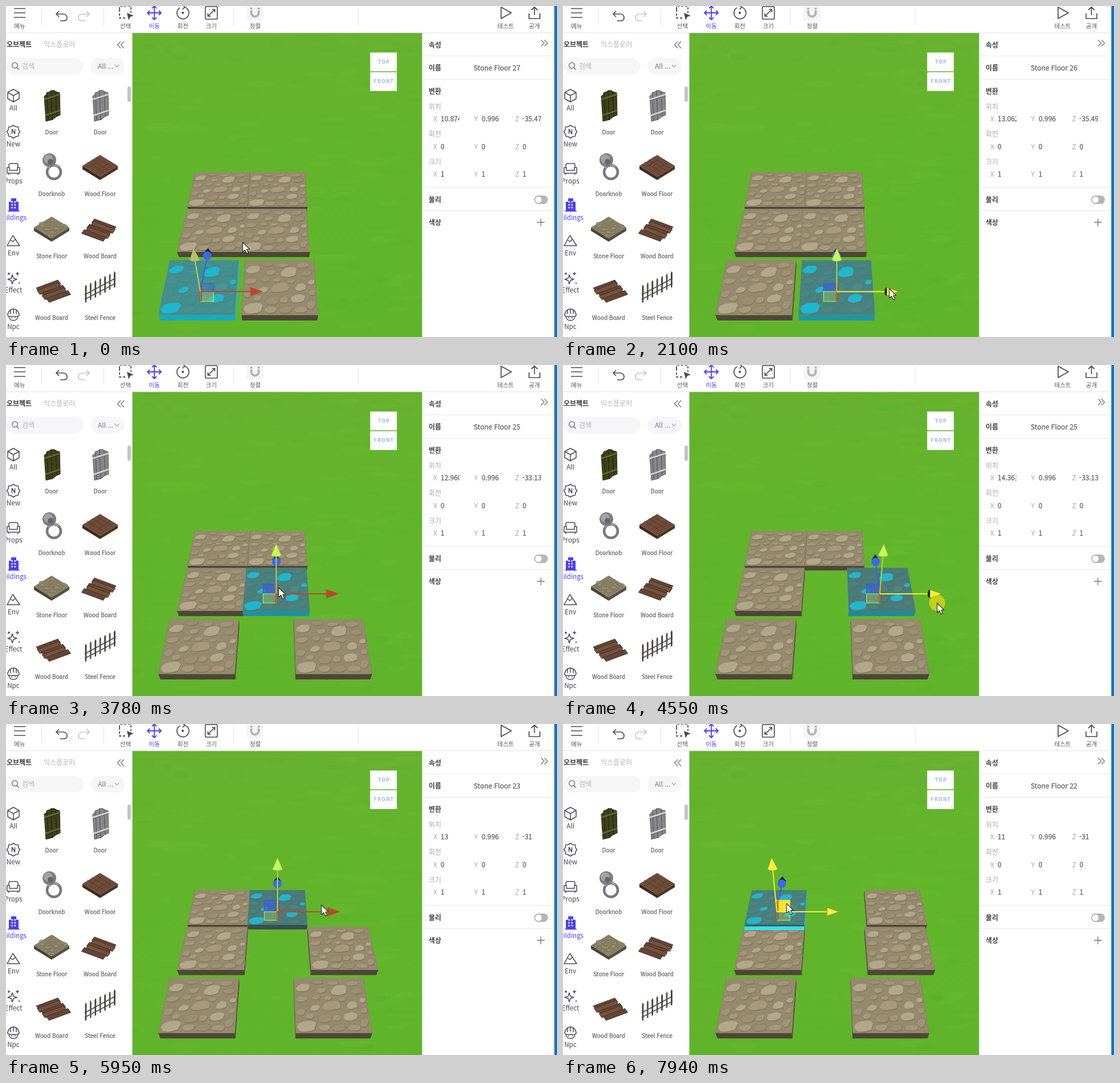
An HTML page that plays this animation: 966 by 580 pixels, repeating every 8 s.

```html
<!DOCTYPE html>
<html lang="ko">
<head>
<meta charset="utf-8">
<title>Tile editor</title>
<style>
html, body { margin: 0; width: 100%; height: 100%; overflow: hidden; background: #fff; }
svg { display: block; width: 966px; height: 580px; }
text { font-family: 'Noto Sans CJK KR', 'Noto Sans CJK JP', 'Noto Sans CJK', 'Noto Sans', sans-serif; }
.medium { stroke: currentColor; stroke-width: .3px; fill: currentColor; }
</style>
</head>
<body>
<svg viewBox="0 0 966 580" xmlns="http://www.w3.org/2000/svg">
  <defs>
    <linearGradient id="grass" x1="0" y1="0" x2="0" y2="1">
      <stop offset="0" stop-color="#66b22f"/><stop offset=".35" stop-color="#62b52a"/><stop offset="1" stop-color="#60b42b"/>
    </linearGradient>
    <clipPath id="view"><rect x="221" y="47" width="509" height="533"/></clipPath>
    <clipPath id="xBox"><rect x="755" y="185" width="40" height="24"/></clipPath>
    <clipPath id="zBox"><rect x="895" y="185" width="43" height="24"/></clipPath>
  </defs>
  <rect width="966" height="580" fill="#fff"/>
  <g clip-path="url(#view)">
    <rect x="221" y="47" width="509" height="533" fill="url(#grass)"/>
    <g id="patches"></g>
    <g id="tiles"></g>
    <g id="gizmo"></g>
  </g>
  <g id="ui"></g>
  <g id="values"></g>
  <g id="pointer"></g>
</svg>
<script>
const $ = id => document.getElementById(id);
const LOOP = 8000, STEP = 70, CX = 475;
const INK = '#4a4a55', BLUE = '#4b3ffb', CYAN = '#1cb8d0';

function seeded(seed) {
  return () => (seed = (seed * 16807) % 2147483647) / 2147483647;
}

// ---- markup helpers
const text = (x, y, s, size = 12, fill = '#555', extra = '') =>
  `<text x="${x}" y="${y}" font-size="${size}" fill="${fill}" color="${fill}" ${extra}>${s}</text>`;
const mid = 'text-anchor="middle"';
const medium = 'class="medium"';
const rect = (x, y, w, h, fill, extra = '') =>
  `<rect x="${x}" y="${y}" width="${w}" height="${h}" fill="${fill}" ${extra}/>`;
const line = (d, color = INK, w = 1.7, extra = '') =>
  `<path d="${d}" fill="none" stroke="${color}" stroke-width="${w}" ${extra}/>`;
const poly = (pts, fill, extra = '') =>
  `<polygon points="${pts.map(p => p.map(n => n.toFixed(1))).join(' ')}" fill="${fill}" ${extra}/>`;
const shape = (d, fill, extra = '') => `<path d="${d}" fill="${fill}" ${extra}/>`;
const dot = (x, y, r, fill, extra = '') => `<circle cx="${x}" cy="${y}" r="${r}" fill="${fill}" ${extra}/>`;

// ---- piecewise linear tracks: [time, value, ...]
function track(keys, t) {
  let i = 0;
  while (i < keys.length - 2 && t >= keys[i + 1][0]) i++;
  const a = keys[i], b = keys[i + 1];
  const p = Math.min(1, Math.max(0, (t - a[0]) / (b[0] - a[0])));
  return a.slice(1).map((v, n) => v + (b[n + 1] - v) * p);
}
const within = (t, spans) => spans.some(([a, b]) => t >= a && t < b);
const mix = (a, b, p) => `rgb(${a.map((v, i) => Math.round(v + (b[i] - v) * p))})`;

// ---- scene
const rows = [
  { w: 105, k: .917, top: 291, bot: 352, h: 8, gy: 329, up: 95, ball: 49, sq: 20, low: 15 },
  { w: 117.5, k: .9, top: 355.5, bot: 431, h: 9, gy: 401, up: 88, ball: 56, sq: 17, low: 16 },
  { w: 134, k: .904, top: 445.5, bot: 541.5, h: 9.5, gy: 500.5, up: 76, ball: 63, sq: 14, low: 17 }
];
const tiles = [
  { id: 22, row: 0, left: 318, x: 11, z: '-31' },
  { id: 23, row: 0, left: 423.5, x: 13, z: '-31', move: 110, dx: 2.12,
    drag: [[6200, 0], [6720, .55], [7140, .945], [7280, 1]] },
  { id: 24, row: 1, left: 300, x: 10.9, z: '-33.13' },
  { id: 25, row: 1, left: 415, x: 12.96, z: '-33.131', move: 120, dx: 1.96,
    drag: [[4200, 0], [4550, .715], [4900, 1]] },
  { id: 27, row: 2, left: 267, x: 10.874, z: '-35.471' },
  { id: 26, row: 2, left: 413, x: 13.062, z: '-35.493', move: 95, dx: 1.4,
    drag: [[2170, 0], [2520, .43], [2870, 1]] }
];
const picks = [[0, 27], [560, 26], [3750, 25], [5500, 23], [7600, 22]];
const cursorPath = [
  [0, 415, 414], [490, 480, 478], [630, 480, 478], [1200, 568, 497], [2100, 572, 495], [2200, 574, 497],
  [2520, 613, 500], [2870, 664, 505], [3150, 664, 505], [3650, 478, 390], [3850, 478, 390],
  [4150, 572, 402], [4200, 572, 403], [4550, 656, 417], [4900, 687, 420], [5110, 687, 420],
  [5450, 480, 325], [5600, 480, 325], [5950, 553, 317], [6200, 566, 328], [6720, 620, 343],
  [7140, 660, 354], [7280, 667, 358], [7380, 660, 355], [7530, 421, 325], [7750, 392, 316], [7940, 392, 314]
];
const glowKeys = [[0, .9], [2100, .65], [2870, .1], [3700, .6], [4550, .5], [5950, .5], [7140, .45], [7940, .6]];
const hovers = [[1200, 3000], [4100, 5100], [6100, 7330]];
const presses = [[2170, 2950], [4200, 5000], [6200, 7300]];

// stones in percent of the tile: u, v, rx, ry; the first six light up
const stones = [
  [13, 17, 10, 8], [63, 22, 12, 10], [94, 40, 5, 5], [28, 54, 7, 6], [75, 70, 10, 8], [15, 88, 13, 11],
  [33, 7, 9, 4], [55, 9, 9, 4], [83, 9, 10, 5], [38, 22, 7, 5], [88, 23, 8, 6], [10, 38, 9, 6],
  [30, 35, 6, 5], [51, 50, 14, 9], [79, 49, 8, 8], [94, 59, 5, 5], [8, 61, 7, 7], [20, 69, 6, 5],
  [40, 73, 10, 8], [56, 72, 6, 6], [92, 81, 6, 8], [38, 90, 9, 6], [58, 90, 9, 6], [78, 90, 9, 6],
  [66, 38, 6, 4], [46, 36, 6, 4]
];
const tones = ['#a09377', '#a6997c', '#9b8e72', '#a3967a'];

function corner(row, left, u, v) {
  const s = row.k + (1 - row.k) * v;
  return [CX + (left + u * row.w - CX) * s, row.top + (row.bot - row.top) * v];
}

function stoneSet(tile, from, to) {
  const row = rows[tile.row];
  let out = '';
  for (let i = from; i < to; i++) {
    const rnd = seeded(977 + i * 131), [u, v, rx, ry] = stones[i], pts = [];
    for (let a = 0; a < 12; a++) {
      const r = .86 + rnd() * .24, th = a * Math.PI / 6, sx = Math.cos(th) * rx * r, sy = Math.sin(th) * ry * r;
      const cu = Math.min(99, Math.max(1, u + sx - sy * .25)), cv = Math.min(98, Math.max(1, v + sy));
      pts.push(corner(row, tile.left, cu / 100, cv / 100));
    }
    const fill = i < 6 || i === 14 ? '#b3a78a' : tones[i % 4];
    const join = 'stroke-linejoin="round"';
    out += poly(pts.map(p => [p[0] + .5, p[1] + 1.2]), '#736850', `opacity=".6" ${join}`) +
      poly(pts, fill, `class="${i < 6 ? 'lit' : ''}" data-fill="${fill}" stroke="#877b61" stroke-width=".5" ${join}`);
  }
  return out;
}

function buildTile(tile) {
  const row = rows[tile.row];
  const quad = [[0, 0], [1, 0], [1, 1], [0, 1]].map(([u, v]) => corner(row, tile.left, u, v));
  $('tiles').insertAdjacentHTML('beforeend', `<g><g class="body"></g><g class="top">${
    poly(quad, '#968a6e')}${stoneSet(tile, 6, stones.length)}${poly(quad, 'none', 'class="tint" opacity=".72"')}${
    stoneSet(tile, 0, 6)}</g></g>`);
  const g = $('tiles').lastElementChild;
  tile.body = g.querySelector('.body');
  tile.top = g.querySelector('.top');
  tile.tint = g.querySelector('.tint');
  tile.lit = g.querySelectorAll('.lit');
}

function drawTile(tile, t, picked, glow) {
  const row = rows[tile.row];
  tile.p = tile.drag ? track(tile.drag, t)[0] : 0;
  const d = (tile.move || 0) * tile.p, left = tile.left + d;
  tile.now = left;
  const shear = (1 - row.k) / (row.bot - row.top);
  tile.top.setAttribute('transform', `matrix(1 0 ${d * shear} 1 ${d * (row.k - shear * row.top)} 0)`);
  const drop = ([x, y]) => [CX + (x - CX) * .98, y + row.h];
  const [tl, tr, br, bl] = [[0, 0], [1, 0], [1, 1], [0, 1]].map(([u, v]) => corner(row, left, u, v));
  const front = !picked ? '#4f4639' : tile.row ? mix([48, 94, 98], [18, 180, 204], glow) : '#39504f';
  const side = picked ? CYAN : '#5d5443';
  tile.body.innerHTML = poly([tr, br, drop(br), drop(tr)], side) + poly([tl, bl, drop(bl), drop(tl)], side) +
    poly([bl, br, drop(br), drop(bl)], front);
  tile.tint.setAttribute('fill', picked ? mix([58, 88, 86], [32, 150, 162], glow) : 'none');
  tile.lit.forEach(s => s.setAttribute('fill', picked ? CYAN : s.dataset.fill));
}

function drawGizmo(tile, t) {
  const row = rows[tile.row], y = row.gy;
  const x = CX + (tile.now + row.w / 2 - CX) * (1 + row.k) / 2, lean = (x - CX) * .09;
  const hover = within(t, hovers), plane = t >= 7800;
  const red = hover || plane ? '#f4ee3c' : '#c2452e';
  const green = plane ? '#f8ee3e' : t < 560 ? '#b7bf72' : '#c4f95c';
  const stem = plane ? '#f2e63c' : '#a5d84a';
  const dir = x < CX - 2 ? 1 : -1, near = x + dir * 23, bx = x - lean, by = y - row.ball;
  const gx = x + lean, gy = y - row.up, hx = gx - lean * .2;
  let out = '';
  if (!tile.row && (tile.id === 22 || tile.p > .5))
    out += rect(tile.now, 354.5, row.w, 6.5, '#2ce2f8');
  out += line(`M${x} ${y}L${bx} ${by}`, '#3a62ea', 2) +
    shape(`M${bx - 7} ${by - 4}L${bx - lean * .1} ${by - 13}l7 9z`, '#17202a') + dot(bx, by, 7.5, '#3f66f0');
  const box = (y0, h, fill, stroke, alpha) =>
    rect(Math.min(x, near), y0, 23, h, fill, `fill-opacity="${alpha}" stroke="${stroke}" stroke-width="1.4"`);
  out += box(y - row.sq, row.sq, plane ? '#f6e62a' : '#3b62d8', plane ? '#f6e62a' : '#3560e6', plane ? 1 : t < 560 ? .3 : .7) +
    box(y, row.low, '#a8d86a', '#a6e04c', .35) +
    poly([[x - 1, y - row.sq + 3], [x + lean * .03 + 2.5, y - row.sq], [x + 2.5, y + row.low - 2], [x - 1, y + row.low]],
      '#a4502f', 'fill-opacity=".55" stroke="#b8452c" stroke-width="1"');
  out += line(`M${x} ${y}L${hx} ${gy + 20}`, stem, 2) +
    shape(`M${hx - 9} ${gy + 21}L${gx} ${gy}L${hx + 9} ${gy + 21}Q${gx} ${gy + 25} ${hx - 9} ${gy + 21}z`,
      green, 'stroke="#7f9c3c" stroke-width=".5"');
  out += line(`M${x} ${y}H${x + 88}`, red, 2.2);
  if (hover) out += `<ellipse cx="${x + 88}" cy="${y}" rx="4" ry="7.5" fill="#1d2214"/>`;
  out += shape(`M${x + 88} ${y - 7.5}L${x + 109} ${y}L${x + 88} ${y + 7.5}z`, red, 'stroke="#7c5a20" stroke-width=".5"');
  $('gizmo').innerHTML = out;
}

function drawValues(tile) {
  const ink = '#666';
  const x = tile.row || tile.p ? (tile.x + (tile.dx || 0) * tile.p).toFixed(3) : tile.x;
  $('values').innerHTML = text(820, 113, `Stone Floor ${tile.id}`, 12, ink, medium) +
    `<g clip-path="url(#xBox)">${text(762, 202, x, 12, ink, medium)}</g>` +
    `<g clip-path="url(#zBox)">${text(905, 202, tile.z, 12, ink, medium)}</g>`;
}

function drawPointer(t) {
  const [x, y] = track(cursorPath, t);
  $('pointer').innerHTML = (within(t, presses) ? dot(x, y, 14, '#d4d414', 'opacity=".85"') : '') +
    `<path transform="translate(${x} ${y})" d="M0 0V17L4 13.4L6.8 19.6L9.8 18.2L7 12.2H12z" fill="#fff" stroke="#222" stroke-width="1.1" stroke-linejoin="round"/>`;
}

// ---- static interface
function toolbar() {
  const label = (x, s, c = '#555') => text(x, 39, s, 10.5, c, mid);
  const split = x => line(`M${x} 4V34`, '#e2e2e6', 1);
  return rect(0, 0, 966, 47, '#fff') + line('M0 47H961', '#d8d8dc', 1) +
    line('M14 4.5H34M14 12H34M14 20H34') + label(24, '메뉴') + [62.5, 171.5, 398.5, 617.5].map(split).join('') +
    line('M93 9L88 14L93 19M88 14H101Q107 15 107 20.5T101 26H95') +
    line('M141 9L146 14L141 19M146 14H133Q127 15 127 20.5T133 26H139', '#c6c6ca') +
    line('M199 6V0H219V12M199 6V21H212', INK, 1.8, 'stroke-dasharray="4 3"') + shape('M212 12L224 17L218 19L215 25z', INK) + label(209.5, '선택') +
    line('M248 12H272M260 0V24M252 8L248 12L252 16M268 8L272 12L268 16M256 4L260 0L264 4M256 20L260 24L264 20', BLUE, 1.8) + label(260, '이동', BLUE) +
    line('M305 3A10.5 10.5 0 1 0 313 2M309 -2L313.5 2L309.5 6') + dot(310, 12, 2, INK) + label(310, '회전') +
    rect(349.5, 1, 21, 22, 'none', `rx="2" stroke="${INK}" stroke-width="1.7"`) + line('M354 18L366 6M361 6H366V11M354 13V18H359') + label(360, '크기') +
    rect(422, 0, 29, 25, '#f4f4f6', 'rx="3"') + line('M430 3V12A6.5 6.5 0 0 0 443 12V3', '#b4b4ba', 4) + line('M428 7H432M441 7H445', '#f4f4f6', 1.4) + label(437, '정렬') +
    line('M868 2L886 12L868 22z', INK, 1.7, 'stroke-linejoin="round"') + label(876, '테스트') +
    line('M926.5 16V2M921 7L926.5 2L932 7M917 13V22H936V13') + label(926.5, '공개');
}

function categories() {
  const icons = [
    ['All', 157, 'M13 -11L23 -5.5V5.5L13 11L3 5.5V-5.5zM3 -5.5L13 0L23 -5.5M13 0V11'],
    ['New', 220, 'M13 -11L17 -8.5L21.5 -8L22 -3L24.5 0L22 4L21.5 8L17 9L13 11.5L9 9L4.5 8L4 4L1.5 0L4 -3L4.5 -8L9 -8.5zM10.5 4V-4L15.5 4V-4'],
    ['Props', 285, 'M5 -2V-6Q5 -9 8 -9H18Q21 -9 21 -6V-2M2 -2H6V3H20V-2H24V8H2zM5 8V11M21 8V11'],
    ['Buildings', 348, ''],
    ['Env', 411, 'M2 9L12 -9L24 9zM8 -1L12 2L16 -2'],
    ['Effect', 476, 'M11 -5L13 1L19 3L13 5L11 11L9 5L3 3L9 1zM20 -10V-4M17 -7H23M5 -9V-5M3 -7H7M23 8V11'],
    ['Npc', 540, 'M3 2A10 11 0 0 1 23 2L21 4H5zM8 -7V0M13 -10V-1M18 -7V0M5 4Q6 11 13 11T21 4M9 6.5H11M15 6.5H17']
  ];
  return icons.map(([name, y, d]) => {
    const on = name === 'Buildings', c = on ? BLUE : INK;
    let out = `<g transform="translate(0 ${y})">${line(d, c, 1.5, 'stroke-linejoin="round"')}</g>`;
    if (on) {
      out += shape('M5 359V343H9V337H18V343H22V359z', BLUE) + line('M3 359.5H24', BLUE, 1.5);
      for (let i = 0; i < 6; i++) out += rect(9.5 + i % 2 * 5, 342 + (i >> 1) * 5, 2.4, 2.6, '#fff');
    }
    return out + (on ? text(36, 374.5, name, 11.5, c, 'text-anchor="end"') : text(13, y + 26, name, 11.7, '#444', mid));
  }).join('');
}

function door(dx, dark, body, bar) {
  return `<g transform="translate(${dx} 0)">` +
    shape('M67 158L71 155V152L77 150L79 148H85L87 150L94 152L95 191L88 194L82 199L70 202z', body, `stroke="${dark}"`) +
    line('M72 155L74 200M79 149L81 200M87 149L89 194', dark, 1.3) + line('M67 164L95 155M69 192L95 183', bar, 3) +
    line('M67 166L95 157M69 194L95 185', dark, 1) + '</g>';
}

function slab(x, y, top, left, right) {
  return shape(`M${x - 31} ${y}L${x} ${y + 19}V${y + 25}L${x - 31} ${y + 6}z`, left) +
    shape(`M${x + 31} ${y}L${x} ${y + 19}V${y + 25}L${x + 31} ${y + 6}z`, right) +
    shape(`M${x - 31} ${y}L${x} ${y - 19}L${x + 31} ${y}L${x} ${y + 19}z`, top);
}

function boards(x, y, flip) {
  let out = `<g transform="translate(${x} ${y}) scale(${flip} 1)">`;
  for (let i = 0; i < 5; i++) {
    const px = -10 - i * 4.4 + i % 2 * 3, py = -18 + i * 4.6;
    out += shape(`M${px} ${py}l38 14l-5 7l-38 -14z`, i % 2 ? '#735240' : '#624535', 'stroke="#40291f" stroke-width=".8"');
  }
  return out + '</g>';
}

function fence() {
  let out = line('M138 506L192 477M138 514L192 486', '#4c4a42', 1.6);
  for (let i = 0; i < 7; i++) {
    const x = 140 + i * 8.4, y = 492 - i * 3.9;
    out += shape(`M${x - 1.5} ${y}l1.5 -4l1.5 3l-.3 ${28 - i * .5}l-2.5 1z`, i % 2 ? '#56534a' : '#454239');
  }
  return out;
}

function library() {
  const names = ['Door', 'Door', 'Doorknob', 'Wood Floor', 'Stone Floor', 'Wood Board', 'Wood Board', 'Steel Fence'];
  const rnd = seeded(41);
  let out = rect(0, 47.5, 221.5, 532.5, '#fff') + text(1, 72, '오브젝트', 12, '#333', 'font-weight="700"') +
    text(66, 72, '익스플로러', 12, '#b4b4b8') + line('M201 62L195.5 68L201 74M207 62L201.5 68L207 74', '#777', 1.3) +
    rect(1, 91, 135, 29, '#f6f6f8', 'rx="14.5"') + dot(15.5, 104, 4.8, 'none', 'stroke="#777" stroke-width="1.5"') +
    line('M19 108L22.5 111.5', '#777') + text(28, 109.5, '검색', 12, '#b0b0b4') +
    rect(148, 91, 60, 29, '#f6f6f8', 'rx="14.5"') + text(161, 109.5, 'All ...', 12, '#777') + line('M191 103L194.5 107L198 103', '#aaa', 1.2) +
    rect(213, 141, 6, 27, '#c4c4c6', 'rx="3"') + categories();
  names.forEach((n, i) => out += text(i % 2 ? 165 : 80, 225 + (i >> 1) * 108.4, n, 10, '#6e6e6e', `${mid} ${medium}`));
  out += door(0, '#25270f', '#3f421c', '#5d6b2c') + door(85, '#5c5c60', '#88888c', '#d2d2d4');
  out += dot(84, 291, 12, 'none', 'stroke="#77777c" stroke-width="4.5"') + line('M74 284A12 12 0 0 1 92 282', '#b8b8bc', 1.5) +
    dot(76, 270, 12, '#7b7b80') + dot(74, 268, 8, '#a2a2a6') + dot(78, 273, 5, '#66666b');
  out += slab(165, 280, '#6e4c39', '#3d2a20', '#4a3427') +
    line('M142 273L173 292M150 269L181 288M157 265L188 284M160 289L183 274M148 281L168 268', '#513626', .8);
  out += slab(80, 388, '#877e63', '#4a4434', '#57503f');
  for (let i = 0; i < 22; i++) {
    const a = rnd() * 2 - 1, b = rnd() * 2 - 1;
    out += `<ellipse cx="${80 + (a + b) * 14}" cy="${388 + (a - b) * 8.5}" rx="${2 + rnd() * 3}" ry="${1.3 + rnd() * 1.5}" fill="#978e72" stroke="#6e664f" stroke-width=".6"/>`;
  }
  return out + boards(165, 391, 1) + boards(81, 498, -1) + fence();
}

function properties() {
  const bold = 'font-weight="700"', pale = '#a8a8ac';
  let out = rect(729.5, 47.5, 231.5, 532.5, '#fff') + rect(961, 0, 5, 580, '#0b74c4') + rect(960, 0, 1.5, 580, '#d4dbe2');
  [['속성', 72.5], ['이름', 113], ['변환', 153.5], ['물리', 343.5], ['색상', 383.5]].forEach(([s, y]) => out += text(741, y, s, 12, '#444', bold));
  [['위치', 180.5], ['회전', 229], ['크기', 277.5]].forEach(([s, y]) => out += text(741, y, s, 12, pale));
  [87.5, 128.5, 317.5, 358.5].forEach(y => out += line(`M730 ${y}H960`, '#e8e8ec', 1));
  [202, 250.5, 299].forEach((y, r) => ['X', 'Y', 'Z'].forEach((s, i) => {
    const x = 749 + i * 71.7;
    out += text(x, y, s, 12, pale);
    if (r) out += text(x + 13, y, r - 1, 12, '#666', medium);
    else if (i === 1) out += text(834, y, '0.996', 12, '#666', medium);
  }));
  return out + line('M938 59.5L943.5 65L938 70.5M944 59.5L949.5 65L944 70.5', '#777', 1.3) +
    rect(926, 332, 24, 15, '#b6b6ba', 'rx="7.5"') + dot(933.5, 339.5, 5.5, '#fff') + line('M931 379H944.5M937.7 372.5V386', '#777', 1.3);
}

function viewBox() {
  const face = 'text-anchor="middle" font-weight="700" letter-spacing="1" style="font-family:\'DejaVu Sans\',sans-serif"';
  return rect(638.5, 81.5, 46.7, 33, '#fff') + rect(638.5, 116, 46.7, 33, '#fff') +
    text(662.5, 101, 'TOP', 8, '#a7bbf2', face) + text(662.5, 135, 'FRONT', 8, '#a7bbf2', face);
}

function grass() {
  const rnd = seeded(7);
  let out = '';
  for (let i = 0; i < 150; i++)
    out += `<ellipse cx="${221 + rnd() * 508}" cy="${48 + rnd() * 532}" rx="${8 + rnd() * 26}" ry="${2 + rnd() * 6}" fill="${i % 2 ? '#6fbd35' : '#57a826'}" opacity=".14"/>`;
  return out;
}

function render(t) {
  const id = picks.filter(p => t >= p[0]).pop()[1], glow = track(glowKeys, t)[0];
  tiles.forEach(tile => drawTile(tile, t, tile.id === id, glow));
  const tile = tiles.find(o => o.id === id);
  drawGizmo(tile, t);
  drawValues(tile);
  drawPointer(t);
}

$('patches').innerHTML = grass();
$('ui').innerHTML = toolbar() + library() + properties() + viewBox();
tiles.forEach(buildTile);

const start = performance.now();
let last = -1;
function tick() {
  const t = Math.floor(((performance.now() - start) % LOOP) / STEP) * STEP;
  if (t !== last) render(last = t);
  requestAnimationFrame(tick);
}
tick();
</script>
</body>
</html>
```
